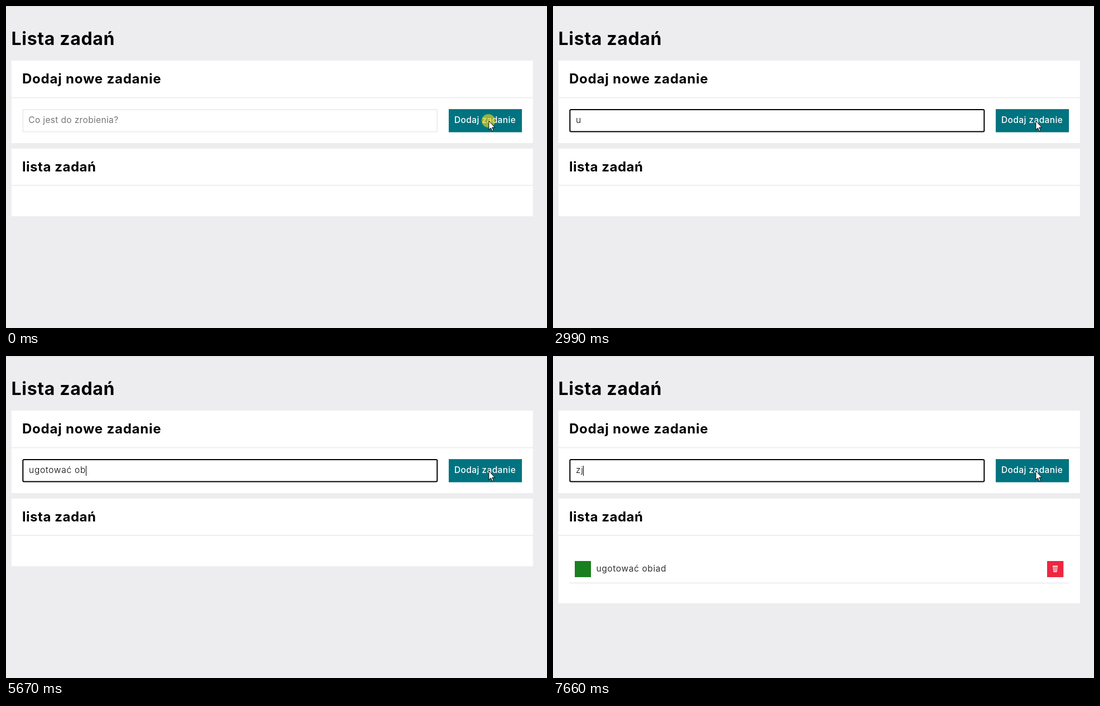
Write an HTML page that moves like this. It is 969 px wide and 578 px high and loops after 8 s.

```html
<!DOCTYPE html>
<html lang="pl">
<head>
<meta charset="utf-8">
<title>Lista zadań</title>
<style>
  html, body { margin: 0; width: 100%; height: 100%; overflow: hidden; background: #ededef; }
  svg { display: block; width: 969px; height: 578px; }
  text { font: 400 15.5px Inter, "Open Sans", sans-serif; font-optical-sizing: none; white-space: pre; }
  .title { font-size: 32px; font-weight: 700; letter-spacing: .65px; }
  .heading { font-size: 24px; font-weight: 700; }
  .button { fill: #fff; font-weight: 500; letter-spacing: .4px; }
  .panel { fill: #fff; }
  .rule { fill: #eee; }
  #field { fill: #fff; stroke-width: 2; }
  #placeholder { fill: #757575; letter-spacing: .35px; }
  #typed { font-weight: 300; letter-spacing: .75px; }
  .task { fill: #333; letter-spacing: .6px; }
</style>
</head>
<body>
<svg viewBox="0 0 969 578">
  <rect width="969" height="578" fill="#ededef"/>
  <rect width="969" height="1" fill="#dadada"/>
  <text class="title" x="9.6" y="69.5">Lista zadań</text>

  <rect class="panel" x="9.8" y="98" width="934" height="148"/>
  <rect class="rule" x="9.8" y="163.5" width="934" height="2"/>
  <text class="heading" x="28.9" y="139.3" letter-spacing=".8">Dodaj nowe zadanie</text>
  <rect id="field" x="30.3" y="186.1" width="742" height="39.5"/>
  <text id="placeholder" x="40.3" y="210">Co jest do zrobienia?</text>
  <text id="typed" x="41" y="210"></text>
  <rect id="caret" y="197" width="1" height="18"/>
  <rect x="793" y="185.1" width="131.1" height="41.5" fill="#007380"/>
  <text class="button" x="803" y="210">Dodaj zadanie</text>

  <rect class="panel" id="list" x="9.8" y="256" width="934"/>
  <rect class="rule" x="9.8" y="321" width="934" height="2"/>
  <text class="heading" x="28.9" y="297" letter-spacing=".55">lista zadań</text>
  <g id="item">
    <rect x="39" y="368" width="29" height="29" fill="#1a7f1e"/>
    <text class="task" x="77.5" y="387">ugotować obiad</text>
    <rect x="885" y="368" width="29.3" height="29" fill="#ed2740"/>
    <g fill="none" stroke="#fff">
      <path d="M895 377.5h9" stroke-width="2"/>
      <path d="M896 379l.9 8.5h5.2l.9-8.5M898.3 379l.3 8M900.7 379l-.3 8"/>
    </g>
    <rect class="rule" x="29.4" y="406.5" width="894.7" height="2"/>
  </g>

  <circle id="click" cx="864" cy="206" r="12" fill="#e6d51e" fill-opacity=".65"/>
  <path d="M864.8 206.2v16l3.6-3.3 2.6 5.8 2.3-1-2.5-5.6h4.9z" fill="#fff" stroke="#000"/>
</svg>
<script>
  const LOOP = 8000, FOCUS = 200, ADDED = 6600;

  // [start ms, typed text, caret visible]
  const steps = [
    [0, "", false], [200, "", true], [730, "", false], [1260, "", true],
    [1730, "", false], [2260, "", true],
    [2460, "u", true], [2990, "u", false], [3070, "ug", true],
    [3270, "ugo", true], [3670, "ugot", true], [3870, "ugoto", true],
    [4140, "ugotow", true], [4470, "ugotowa", true], [4930, "ugotować", true],
    [5200, "ugotować ", true], [5400, "ugotować o", true],
    [5670, "ugotować ob", true], [5800, "ugotować obi", true],
    [6000, "ugotować obia", true], [6270, "ugotować obiad", true],
    [6600, "", true], [6800, "", false], [7330, "", true],
    [7460, "z", true], [7660, "zj", true]
  ];

  const el = id => document.getElementById(id);
  const show = (id, on) => el(id).setAttribute("visibility", on ? "visible" : "hidden");
  const set = (id, attrs) => {
    for (const key in attrs) el(id).setAttribute(key, attrs[key]);
  };

  function draw(t) {
    const [, text, caretOn] = steps.findLast(step => step[0] <= t);
    const focused = t >= FOCUS, added = t >= ADDED;
    el("typed").textContent = text;
    const width = text ? el("typed").getComputedTextLength() : 0;
    set("caret", { x: 41 + Math.floor(width) });
    set("field", { stroke: focused ? "#000" : "#eee", rx: focused ? 2 : 0 });
    set("list", { height: added ? 187.8 : 121.3 });
    show("placeholder", !text);
    show("caret", caretOn);
    show("click", !focused);
    show("item", added);
  }

  let start;
  function tick(now) {
    start ??= now;
    draw((now - start) % LOOP);
    requestAnimationFrame(tick);
  }
  draw(0);
  requestAnimationFrame(tick);
</script>
</body>
</html>
```
